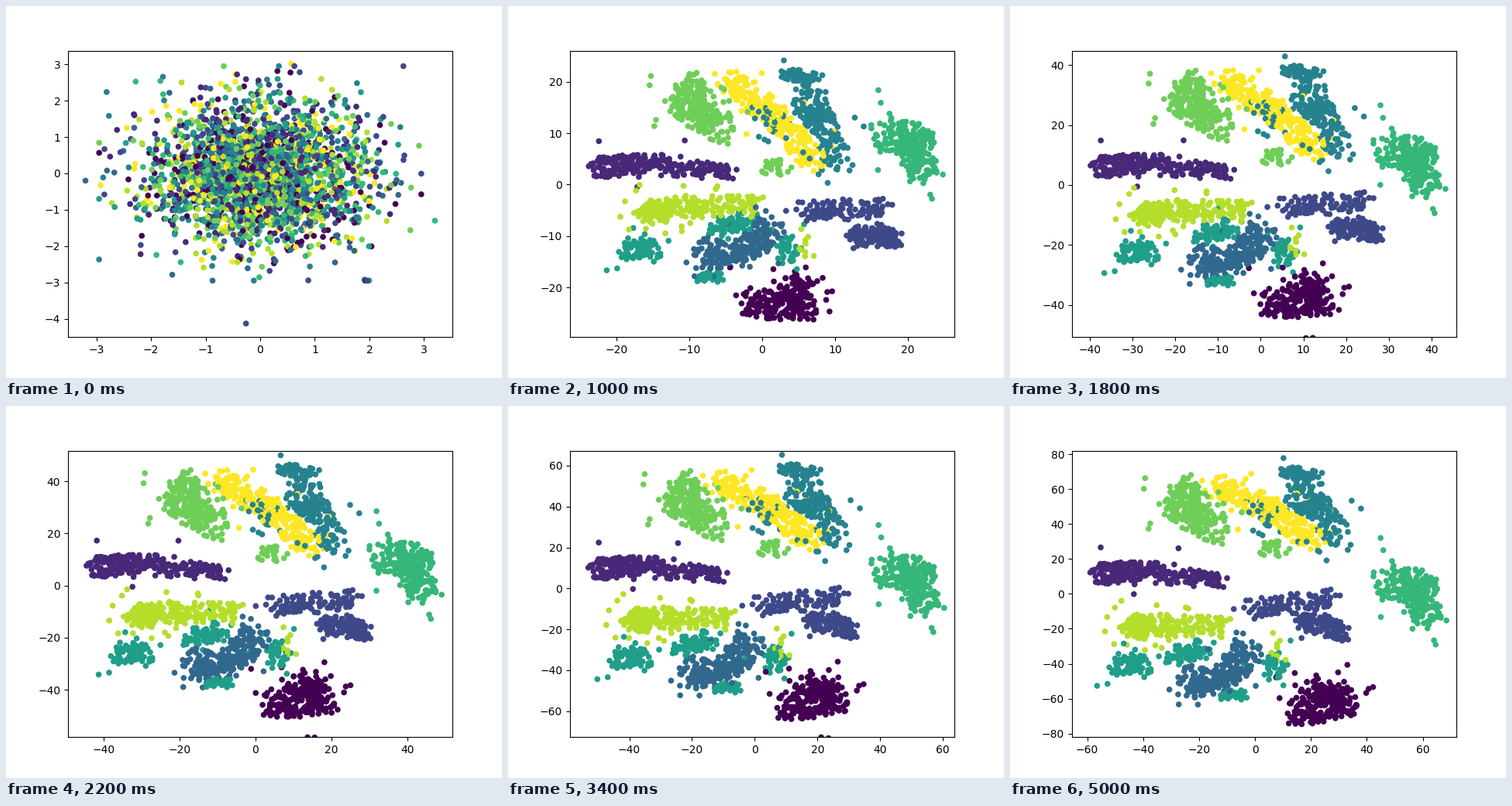
A matplotlib script that plays this animation: 640 px wide and 480 px high, repeating every 5200 ms.

```python
import numpy as np
import matplotlib.pyplot as plt
from matplotlib.animation import FuncAnimation

FRAMES, STEP = 26, 200
FORMED, LAST = 5, FRAMES - 1      # clusters stand from FORMED on, then drift
CENTRE = np.array([328, 242.4])   # middle of the axes box, pixels from top left
BOX = np.array([248, -184.8])     # its half size, y pointing up
rng = np.random.default_rng(7)
parts = []


def progress(frame):
    return np.clip((frame - FORMED) / (LAST - FORMED), 0, 1)


def drift(frame):
    return (1 - np.exp(-2 * progress(frame))) / (1 - np.exp(-2))


def view(frame):
    """Half ranges of both axes and their middles as parts of those."""
    if frame == 0:
        return np.array([3.52, 3.94]), np.array([0, -0.143])
    if frame <= 3:
        half = np.full(2, 1.4 * 2.0 ** frame)
    else:
        u, v = frame - 2.2, frame - 1.6
        half = np.array([88.7 * u / (u + 6.62), 122.4 * v / (v + 11.54)])
    mid = [0.048 * drift(frame), -0.065 * np.cos(np.pi / 2 * progress(frame))]
    return half, np.array(mid)


def zero(frame):
    return CENTRE - BOX * view(frame)[1]


def group(label, n, width, spine, shift, tail=None):
    """Points strewn along a spine; its ends drift by shift and tail."""
    t = rng.random(n)
    knots = np.linspace(0, 1, len(spine))
    pos = np.column_stack([np.interp(t, knots, axis) for axis in zip(*spine)])
    move = np.outer(1 - t, shift) + np.outer(t, tail or shift)
    stray = np.where(rng.random(n) < 0.07, 2.8, 1.05)
    r, a = width * stray * np.sqrt(rng.random(n)), rng.uniform(0, 2 * np.pi, n)
    off = np.column_stack([r * np.cos(a), r * np.sin(a)])
    parts.append((np.full(n, label), pos - zero(FORMED),
                  pos + move - zero(LAST), off))


group(0, 190, 19, [(312, 380), (350, 388), (396, 388)], (57, 13), (49, -9))
group(0, 65, 15, [(358, 366), (372, 358), (388, 366)], (25, 5))
group(1, 255, 13, [(112, 209), (170, 203), (285, 213)], (0, 8), (-15, 11))
group(2, 130, 12, [(445, 297), (503, 299)], (-68, -20), (-71, -7))
group(2, 105, 14, [(378, 264), (485, 263)], (-70, -2), (-70, -12))
group(3, 240, 20, [(340, 283), (308, 316), (250, 320)], (-32, 29), (-22, 37))
group(4, 50, 10, [(358, 86), (398, 95)], (-3, -3))
group(4, 190, 19, [(383, 115), (404, 150), (426, 203)], (-13, -3), (-2, -35))
group(4, 25, 22, [(330, 145), (350, 160)], (-10, -8))
group(5, 90, 13, [(150, 313), (188, 314)], (-15, 20))
group(5, 75, 13, [(265, 286), (312, 274)], (-58, 37))
group(5, 45, 16, [(355, 322), (368, 310)], (-20, 21))
group(5, 30, 7, [(243, 350), (280, 349)], (28, 23))
group(6, 260, 22, [(486, 166), (528, 172), (532, 212)], (0, 62), (3, 58))
group(7, 230, 21, [(235, 105), (230, 130), (280, 158)], (-10, 5), (-10, 0))
group(7, 24, 11, [(330, 205), (360, 208)], (-5, -24))
group(8, 235, 15, [(175, 268), (205, 262), (320, 254)], (-20, 18), (-45, 28))
group(8, 10, 6, [(381, 297), (380, 320)], (-39, 5))
group(9, 250, 17, [(282, 94), (340, 138), (398, 203)], (-19, 9), (-6, -29))

labels, begin, end, offset = (np.concatenate(p) for p in zip(*parts))
order = rng.permutation(len(labels))
labels, begin, end, offset = (a[order] for a in (labels, begin, end, offset))

# Opening cloud; four far points reach towards the edges of the axes
cloud = np.clip(rng.normal(0, 1, begin.shape), -2.95, 2.95)
cloud[:4] = [(-3.2, -0.2), (3.2, -1.3), (0.57, 3.02), (-0.26, -4.13)]
cloud *= BOX / view(0)[0]


def points(frame):
    pos = begin + (end - begin) * drift(frame)
    pos = pos + offset * min(1, 0.25 + 0.2 * frame)
    pos = pos + (cloud - pos) * max(0, 1 - 0.7 * frame)
    return pos / BOX * view(frame)[0]


fig, ax = plt.subplots(figsize=(6.4, 4.8), dpi=100)
dots = ax.scatter(*points(0).T, s=20, c=labels, cmap="viridis")


def draw(frame):
    half, mid = view(frame)
    low, high = half * (mid - 1), half * (mid + 1)
    ax.set_xlim(low[0], high[0])
    ax.set_ylim(low[1], high[1])
    dots.set_offsets(points(frame))
    return [dots]


anim = FuncAnimation(fig, draw, frames=FRAMES, interval=STEP,
                     init_func=lambda: draw(0), repeat=True, repeat_delay=0)
plt.show()
```
